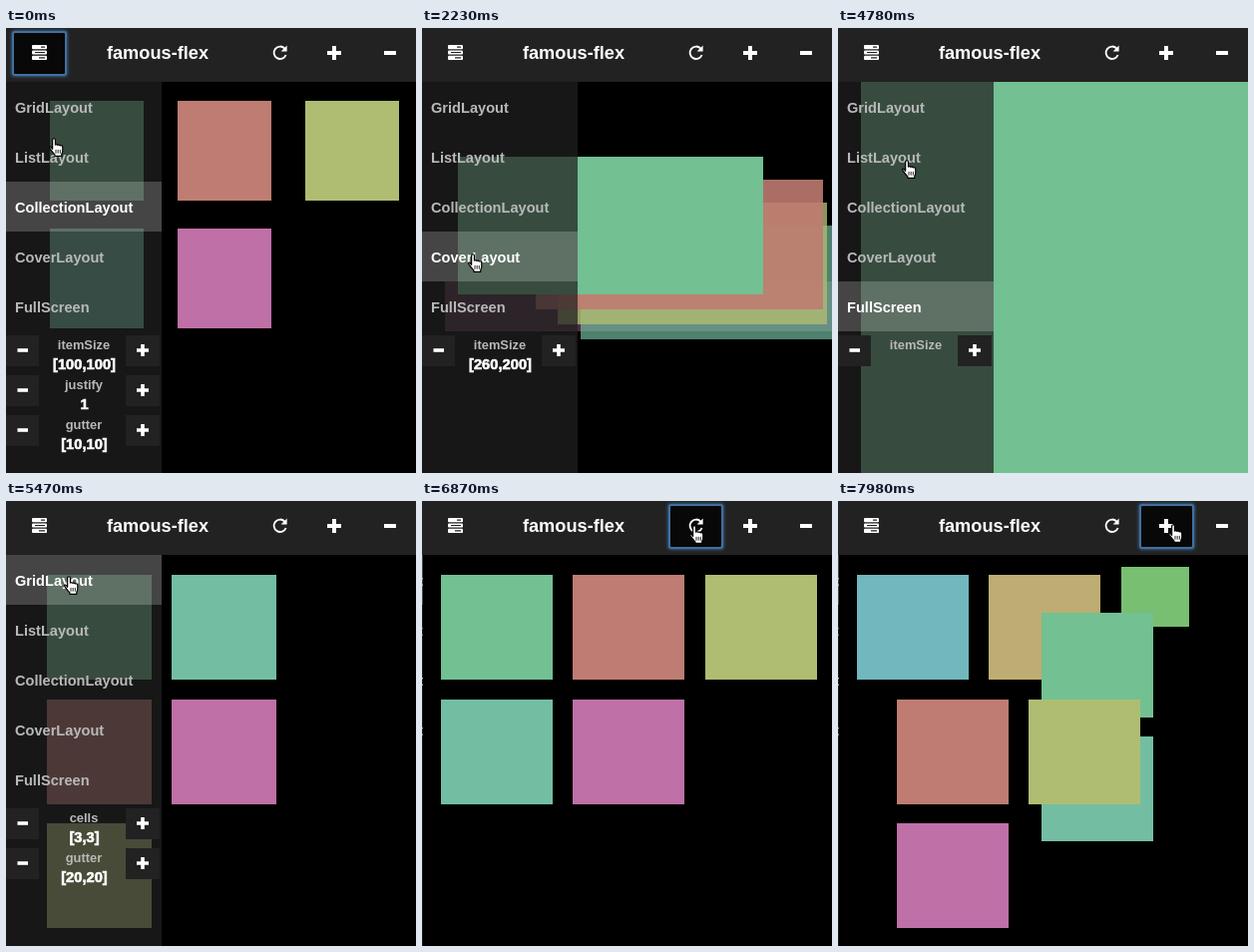
Write an HTML page that moves like this. It is 411 px wide and 446 px high and loops after 8 s.

```html
<!DOCTYPE html>
<html lang="en">
<head>
<meta charset="utf-8">
<title>famous-flex</title>
<style>
  html, body { margin: 0; width: 100%; height: 100%; overflow: hidden; background: #000; }
  body { font-family: "Liberation Sans", Arial, sans-serif; font-weight: bold; color: #fff; }
  div, svg { position: absolute; box-sizing: border-box; white-space: nowrap; }
  #stage { left: 0; top: 0; width: 411px; height: 446px; overflow: hidden; background: #000; }
  #view, #panel { left: 0; top: 54px; height: 392px; overflow: hidden; }
  #view { width: 411px; z-index: 0; }
  #panel { width: 156px; background: rgba(33, 33, 33, .72); }
  #mark { left: 0; width: 156px; height: 50px; background: rgba(255, 255, 255, .2); }
  .label { left: 9px; font-size: 14.6px; line-height: 50px; height: 50px; color: #b9b9b9; }
  .label.on { color: #fff; }
  .option { left: 0; width: 156px; height: 40px; text-align: center; }
  .option svg { top: 0; height: 31px; background: #222; }
  .name { left: 0; width: 156px; top: 0; font-size: 12.9px; line-height: 19px; color: #b9b9b9; }
  .value { left: 0; width: 157px; top: 20px; font-size: 14.7px; line-height: 18px; -webkit-text-stroke: .6px #fff; }
  #bar { left: 0; top: 0; width: 411px; height: 54px; background: #222; }
  #title { left: 0; width: 304px; text-align: center; font-size: 18.2px; line-height: 50px; }
  #ring { top: 3px; width: 55px; height: 45px; background: #080808; border: 2px solid #41709f; border-radius: 3px; box-shadow: 0 0 3px 1px #34587c; }
  #icons { left: 0; top: 0; }
  #hand { left: -1px; top: -1px; }
</style>
</head>
<body>
<div id="stage">
  <div id="view"></div>
  <div id="panel"><div id="mark"></div></div>
  <div id="bar">
    <div id="ring"></div>
    <div id="title">famous-flex</div>
    <svg id="icons" width="411" height="54" fill="#fff">
      <rect x="26" y="17" width="15" height="4.2" rx="1"/>
      <rect x="26" y="22.4" width="15" height="4.2" rx="1"/>
      <rect x="26" y="27.8" width="15" height="4.2" rx="1"/>
      <path d="M35 19.1h4M29 24.5h10M33 29.9h6" stroke="#222" stroke-width="1.2"/>
      <path d="M279.4 20.6A6.2 6.2 0 1 0 280.6 27" fill="none" stroke="#fff" stroke-width="1.9"/>
      <path d="M281.6 17.6V23.6h-6z"/>
      <path d="M322 25h14M329 18v14M379 25h12" stroke="#fff" stroke-width="4"/>
    </svg>
  </div>
  <svg id="hand" width="17.5" height="20.5" viewBox="0 0 16 19">
    <path d="M4.2 10.5V2.3q0-1.6 1.3-1.6t1.3 1.6v4.3q1-1 2.3.2 1.2-.7 2.2.5 2.3-.5 2.3 1.7v3q0 1.6-.9 3v2H6.3v-1.4Q4.3 13.7 2.8 11.5 1 9.2 1.4 8.6q1-.9 2.8 1.9z"
      fill="#fff" stroke="#000" stroke-width="1.1" stroke-linejoin="round"/>
    <path d="M7.3 11v3.5M9.3 11v3.5M11.3 11v3.5" stroke="#000" stroke-width=".8"/>
  </svg>
</div>
<script>
const LOOP = 8000, W = 415, H = 394;
const $ = id => document.getElementById(id);
const add = (parent, cls, text = '') => {
  const el = document.createElement('div');
  el.className = cls;
  el.textContent = text;
  parent.append(el);
  return el;
};

// Damped spring: ratio 0.8, period 300 ms, at rest after 290 ms
function spring(ms) {
  if (ms <= 0) return 0;
  if (ms >= 290) return 1;
  const w = 2 * Math.PI * ms / 300, d = .6 * w;
  return 1 - Math.exp(-.8 * w) * (Math.cos(d) + .8 / .6 * Math.sin(d));
}
const mix = (a, b, p) => a + (b - a) * p;

// A spec is [x, y, width, height, alignment, opacity, scale]
const collection = i => [22 + 135.6 * (i % 3), 19 + 128 * (i / 3 | 0), 100, 100, 0, 1, 1];
const list = i => [0, 50 * i, W, 50, 0, 1, 1];
const cover = i => i < 4
  ? [[-22, 109, 139, 171][i], 0, 260, 200, .5, 1 - .18 * i, 1 - .1 * i]
  : [0, 200, W, 50, 0, 0, 1];
const full = i => i ? cover(i).with(5, 0) : [0, 0, W, H, 0, 1, 1];
const cell = (col, row) => {
  const w = (W - 80) / 3, h = (H - 80) / 3;
  return [19.2 + col * (w + 20.5), 20 + row * (h + 20), w, h, 0, 1, 1];
};
const columns = i => cell(i / 3 | 0, i % 3);
const rows = i => cell(i % 3, i / 3 | 0);
const tiny = ([x, y]) => [x, y - 12, 49, 40, 0, 1, 1];

// Five tiles to begin with; extra ones go in front of them
const slot = (i, extra) => i < 5 ? i + extra : i - 5;
const grown = extra => i => i < 5 + extra ? rows(slot(i, extra)) : null;
const gridZ = [2, 3, 5, 1, 3, 0, 0, 0];
const stages = [
  { at: -1000, to: collection },
  { at: 140, to: list },
  { at: 2148, to: cover, z: [5, 4, 3, 2, 1] },
  { at: 3658, to: full, z: [2, 4, 3, 1, 0] },
  { at: 5175, to: columns, from: i => i ? tiny(columns(i)) : full(0) },
  { at: 6570, to: rows },
  { at: 7480, to: grown(1), z: gridZ },
  { at: 7718, to: grown(2), z: gridZ },
  { at: 7932, to: grown(3), z: gridZ }
];

const colors = ['#73c092', '#bf7c72', '#afbd72', '#73bea2', '#be70a7', '#72b7bd', '#bdad72', '#78bf72'];
const tiles = colors.map(color => {
  const el = add($('view'), 'tile');
  el.style.background = color;
  return el;
});

const labels = ['GridLayout', 'ListLayout', 'CollectionLayout', 'CoverLayout', 'FullScreen'].map((text, i) => {
  const el = add($('panel'), 'label', text);
  el.style.top = i * 50 + 1 + 'px';
  return el;
});
const button = (x, w, path) =>
  `<svg style="left:${x}px" width="${w}" height="31"><path d="${path}" stroke="#fff" stroke-width="3.6"/></svg>`;
const options = [0, 1, 2].map(i => {
  const el = add($('panel'), 'option');
  el.style.top = 254 + i * 40 + 'px';
  el.innerHTML = button(0, 33, 'M11.5 15h10.5') + button(120, 34, 'M11 15h12M17 9v12');
  return { el, name: add(el, 'name'), value: add(el, 'value') };
});

const menus = [
  { at: 0, row: 2, opts: [['itemSize', '[100,100]'], ['justify', '1'], ['gutter', '[10,10]']] },
  { at: 120, row: 1, opts: [['itemSize', '50']] },
  { at: 2110, row: 3, opts: [['itemSize', '[260,200]']] },
  { at: 3690, row: 4, opts: [['itemSize', '']] },
  { at: 5180, row: 0, opts: [['cells', '[3,3]'], ['gutter', '[20,20]']] }
];
const rings = [[0, 6], [120, -99], [6190, 6], [6560, 247], [7440, 302]];
const path = [
  [0, 43, 111], [60, 43, 111], [140, 43, 119], [970, 43, 119], [1000, 49, 126], [1120, 74, 127],
  [1300, 74, 127], [2050, 46, 227], [3280, 46, 227], [3510, 48, 285], [4330, 48, 285],
  [4640, 69, 180], [4950, 58, 76], [5950, 58, 76], [6170, 28, 18], [6290, 28, 18],
  [6520, 268, 25], [7040, 268, 25], [7260, 331, 24], [LOOP, 331, 24]
];
const latest = (steps, t, key = 'at') => steps.findLastIndex(s => s[key] <= t);

function drawTiles(t, open) {
  const n = latest(stages, t), stage = stages[n], p = spring(t - stage.at);
  const squeeze = 1 - 23 / W * open;
  tiles.forEach((el, i) => {
    const to = i < 5 || n > 5 ? stage.to(i) : null;
    el.style.display = to ? '' : 'none';
    if (!to) return;
    const before = i < 5 || n > 6 ? stages[Math.max(0, n - 1)].to(i) : null;
    const from = stage.from ? stage.from(i) : before || tiny(to);
    const [x, y, w0, h0, a, o, s] = to.map((v, k) => mix(from[k], v, p));
    const w = w0 * s, h = h0 * s;
    Object.assign(el.style, {
      left: Math.round(23 * open + squeeze * (x + a * (W - w))) + 'px',
      top: Math.round(y + a * (H - h)) + 'px',
      width: Math.round(squeeze * w) + 'px',
      height: Math.round(h) + 'px',
      opacity: Math.max(0, Math.min(1, o)),
      zIndex: stage.z ? stage.z[i] : i
    });
  });
}

let shown = -1;
function drawMenu(t, closed) {
  const n = latest(menus, t);
  if (n !== shown) {
    const { row, opts } = menus[shown = n];
    $('mark').style.top = row * 50 + 'px';
    labels.forEach((el, i) => el.classList.toggle('on', i === row));
    options.forEach(({ el, name, value }, i) => {
      el.style.display = opts[i] ? '' : 'none';
      [name.textContent, value.textContent] = opts[i] || ['', ''];
    });
  }
  const c = Math.min(1, closed);
  $('panel').style.transform = `translateX(${-155 * c}px)`;
  labels.forEach(el => el.style.transform = `translateX(${(147 - el.offsetWidth) * c}px)`);
}

function drawHand(t) {
  const i = Math.min(latest(path, t, 0), path.length - 2);
  const [a, b] = [path[i], path[i + 1]], p = (t - a[0]) / (b[0] - a[0]);
  $('hand').style.transform = `translate(${Math.round(mix(a[1], b[1], p))}px, ${Math.round(mix(a[2], b[2], p))}px)`;
}

const start = performance.now();
function frame() {
  const t = (performance.now() - start) % LOOP;
  const closed = spring(t - 6220);
  drawTiles(t, 1 - closed);
  drawMenu(t, closed);
  drawHand(t);
  $('ring').style.left = rings[latest(rings, t, 0)][1] + 'px';
  requestAnimationFrame(frame);
}
frame();
</script>
</body>
</html>
```
